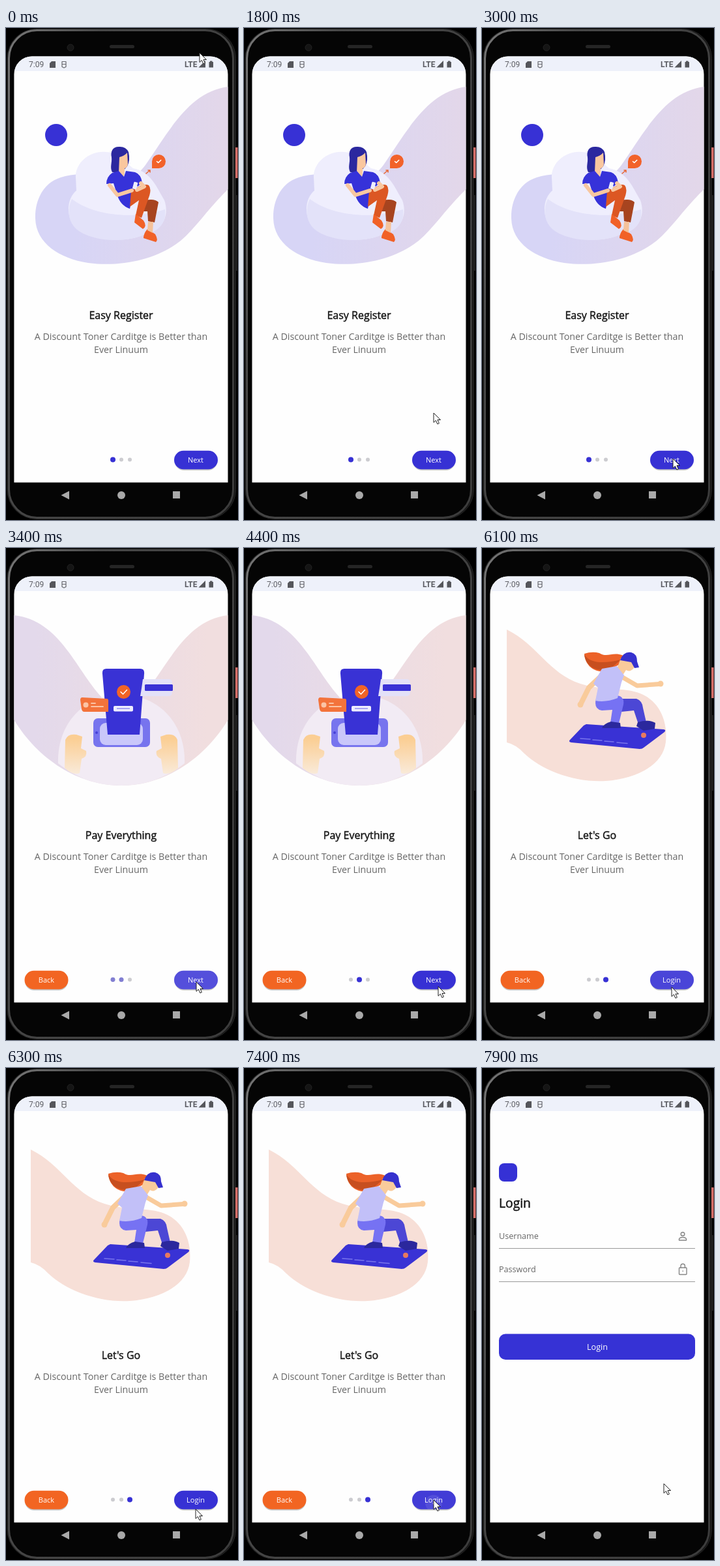
Recreate the animation shown at these times as an HTML page. Size 356 by 754 pixels, loop 8 s.

```html
<!DOCTYPE html>
<html lang="en">
<head>
<meta charset="utf-8">
<title>Onboarding</title>
<style>
  html, body { margin: 0; width: 100%; height: 100%; overflow: hidden; background: #000; }
  svg { display: block; width: 356px; height: 754px; }
  text { font-family: "Open Sans", sans-serif; }
  .status { font: 12px Roboto, sans-serif; fill: #5c5d63; }
  .net { font-weight: 600; }
  .title { font-size: 16px; fill: #161616; stroke: #161616; stroke-width: .45px; text-anchor: middle; }
  .body { font-size: 14.26px; fill: #666; text-anchor: middle; }
  .btn { font-size: 11px; fill: #fff; text-anchor: middle; }
  .field { font-size: 12.6px; fill: #666; }
  .line { fill: none; stroke-linecap: round; stroke-linejoin: round; }
</style>
</head>
<body>
<svg viewBox="0 0 356 754">
  <defs>
    <linearGradient id="lilac"><stop offset=".2" stop-color="#d7d5f6"/><stop offset="1" stop-color="#e3d7e9"/></linearGradient>
    <linearGradient id="wings"><stop offset=".1" stop-color="#e3d9eb"/><stop offset=".9" stop-color="#f1dedf"/></linearGradient>
    <linearGradient id="hand" x2="0" y2="1"><stop offset=".1" stop-color="#fbce93"/><stop offset="1" stop-color="#f9ead9"/></linearGradient>
    <linearGradient id="metal" x2="1" y2=".6"><stop stop-color="#777"/><stop offset=".3" stop-color="#484848"/><stop offset="1" stop-color="#3c3c3c"/></linearGradient>
    <clipPath id="pill"><rect x="258" y="647.700" width="67" height="28.600" rx="14.300"/></clipPath>
    <clipPath id="glass"><path d="M12.400 696.600V71a27.500 27.500 0 0 1 27.500-27.500H313a27.500 27.500 0 0 1 27.500 27.500V696.600Z"/></clipPath>
  </defs>

  <!-- phone body -->
  <rect width="356" height="754"/>
  <rect x="2" y="1.500" width="350.500" height="751" rx="45" fill="#161616" stroke="#262626"/>
  <rect x="4.500" y="3.500" width="344" height="747" rx="43" fill="#050505" stroke="url(#metal)" stroke-width="3"/>
  <rect x="352" y="183" width="3.500" height="47" fill="#d9716b"/>
  <rect x="353" y="256" width="2" height="116" fill="#1c1c1c"/>
  <rect x="159" y="26" width="38" height="5" rx="2.500" fill="#252525"/>
  <circle cx="99" cy="30" r="5" fill="#151515" stroke="#222"/>
  <g fill="#a9a9a9">
    <path d="M84.500 716l12.500-6.500v13Z"/><circle cx="177" cy="716" r="6"/><rect x="256" y="710" width="11" height="11"/>
  </g>

  <g clip-path="url(#glass)">
    <rect x="12" y="43" width="329" height="654" fill="#fefefe"/>
    <rect x="12" y="43" width="329" height="23" fill="#eef1fa"/>
    <text class="status" x="35" y="60">7:09</text>
    <text class="status net" x="274" y="60">LTE</text>
    <g fill="#55565b">
      <path d="M70 51h6v10h-9v-7Z"/><path d="M306 50v10.500h-10.500Z"/>
      <path d="M311.500 52h1.500v-1.500h3.500v1.500h1.500v8.500h-6.500Z"/>
      <path class="line" d="M86 51.500h6v4h-6Zm0 4v4l3 1.500 3-1.500v-4" stroke="#66676c" stroke-width="1.200"/>
    </g>

    <g class="page">
      <path fill="url(#lilac)" d="M341 90C282 97 250 158 216 207C196 237 170 236 150 230C128 222 102 223 84 229C58 237 44 263 45 292C46 330 82 353 126 360C178 367 233 354 268 326C292 306 312 274 341 247Z"/>
      <path fill="#efeefd" d="M107 229C106 207 128 188 153 190C174 191 184 206 195 215C223 220 232 246 243 264C252 289 238 312 213 316C182 331 127 326 105 304C92 288 93 262 108 249Z"/>
      <path fill="#e3e2f9" d="M101 262C132 286 192 295 244 278C247 299 233 313 213 316C180 332 122 326 104 304C95 293 94 276 101 262Z"/>
      <circle cx="77" cy="164" r="17" fill="#3731d5"/>
      <path fill="#2b289f" d="M175 182C164 181 160 189 162 198C163 207 159 213 163 221L177 222 186 212Q191 203 188 190Q184 182 175 182Z"/>
      <path fill="#fac79e" d="M174 198Q182 196 186 191L187 208Q186 215 182 215V221L181 228 173 221Z"/>
      <path fill="#3632d9" d="M163 222L173 219 181 228 184 219 198 221Q207 224 209 237L202 243 198 239 196 249 190 277Q175 272 170 254L165 238 154 239Q154 228 163 222Z"/>
      <path fill="#a7441f" d="M214 264Q228 261 234 267L228 298 218 296 217 281H203Z"/>
      <path fill="#dc5723" d="M192 250Q211 237 219 241Q224 247 219 260L208 291 199 287 204 264 190 274Z"/>
      <path class="line" stroke="#f8c7a0" stroke-width="6" d="M159 241L171 256 193 249M207 238L212 243 201 248"/>
      <path fill="#f16127" d="M199 285L211 295Q217 304 210 308L197 298ZM217 308L229 316Q234 325 230 328L211 322Q211 315 217 308Z"/>
      <path fill="#f5c29a" d="M218 297h8l-1 17-8-4Z"/>
      <rect x="195" y="236" width="6" height="11" rx="1" fill="#eeeefc" transform="rotate(15 198 242)"/>
      <path class="line" stroke="#e76a38" stroke-width="1.600" d="M215 223l6-5m-3 0h3v3"/>
      <path fill="#f2622a" d="M224 215V204.500a10.500 10.500 0 1 1 10.500 10.500Z"/>
      <path class="line" stroke="#fff" stroke-width="1.600" d="M231.500 204.500l2.200 2 4-4"/>
      <text class="title" x="176.500" y="446">Easy Register</text>
    </g>

    <g class="page">
      <path fill="url(#wings)" d="M12 103C85 111 108 190 151 233Q177 256 203 233C246 190 270 111 341 103V263C303 325 242 364 177 364S50 325 12 263Z"/>
      <path fill="#f2ebf4" d="M80 330C78 270 119 225 177 225S276 270 274 330C244 353 214 364 177 364S109 353 80 330Z"/>
      <path id="palm" fill="url(#hand)" d="M91 294Q95 284 108 286L117 289 115 307 123 311Q125 320 116 323L113 345Q103 349 90 337Z"/>
      <use href="#palm" transform="matrix(-1 0 0 1 354 0)"/>
      <rect x="134" y="261" width="87" height="44" rx="7" fill="#7774ee"/>
      <rect x="144" y="268" width="66" height="34" rx="9" fill="#c9c7fa"/>
      <circle cx="139" cy="283" r="2" fill="#4540d8"/>
      <path fill="#3932d5" d="M154 185H206Q213 185 212 193L205 286H156L148 193Q147 185 154 185Z"/>
      <circle cx="180.500" cy="220.500" r="10.500" fill="#f26426"/>
      <path class="line" stroke="#fff" stroke-width="1.500" d="M176 220.500l3.500 3.500 6-6.500"/>
      <rect x="165" y="242" width="30" height="8.500" rx="2" fill="#eeedff"/>
      <path stroke="#918df0" stroke-width="1.500" d="M170 246h20"/>
      <path fill="#e3e1f8" d="M210 201h40q5 0 5 6v14q0 6-6 6h-43l2-12Z"/>
      <rect x="213" y="209" width="43" height="10" rx="1.500" fill="#3a32d5"/>
      <path fill="#f3733b" d="M117 229L155 231Q157 231 157 234V251H120Q117 251 116 247L114 233Q114 229 117 229Z"/>
      <circle cx="122.500" cy="240.500" r="4" fill="#fbc4a5"/>
      <path class="line" stroke="#fbc4a5" stroke-width="1.800" d="M131 238h6M131 243h18"/>
      <text class="title" x="176.500" y="446">Pay Everything</text>
    </g>

    <g class="page">
      <path fill="#f7dfd7" d="M38 125C84 147 102 192 151 208C184 219 219 213 243 223C273 235 285 266 282 297C278 335 233 354 190 357C142 360 91 340 65 315Q52 301 38 298Z"/>
      <path class="line" stroke="#f9cb9b" stroke-width="8" d="M181 198L164 214 152 238"/>
      <path class="line" stroke="#f9cb9b" stroke-width="7" d="M212 196L238 211 272 208.500"/>
      <path fill="#ec6229" d="M217 165C200 158 193 169 180 161Q169 158 157 162C158 178 169 188 182 189C196 190 203 180 217 177Z"/>
      <path fill="#c74f1f" d="M157 163C165 178 190 177 213 171L204 179C188 194 159 187 157 163Z"/>
      <path fill="#f9cb9b" d="M213 169L234 173 233 184Q227 191 221 187L216 195 207 185Z"/>
      <path fill="#3631ce" d="M212 172Q217 158 229 160Q238 162 238 174L241 183 234 184 229 175Z"/>
      <path fill="#3932d5" d="M160 270L279 278Q283 279 280 282L248 306Q246 308 242 308L137 298Q132 297 135 294L156 272Z"/>
      <path class="line" stroke="#7975ed" stroke-width="1.500" d="M151 292l15 1M170 294l14 1M188 296l14 1M207 298l16 1.500"/>
      <circle cx="248" cy="287" r="4" fill="#e8795f"/>
      <path fill="#4c47d5" d="M202 231L237 231Q246 234 247 245L252 267 240 270 233 249 204 252Z"/>
      <path fill="#7672f3" d="M175 231L208 226Q219 228 217 240L210 269 197 268 200 248 184 249Q171 247 175 231Z"/>
      <path fill="#c2c0f8" d="M184 185L207 181 218 195 214 206 208 230Q190 237 174 234L178 214 171 208Z"/>
      <path fill="#2b289d" d="M198 266L212 268 213 276H184Q187 269 198 266ZM239 267Q256 262 266 268L265 277 248 280 237 273Z"/>
      <circle cx="151" cy="240" r="4.500" fill="#f9cb9b"/><circle cx="274" cy="208" r="4.500" fill="#f9cb9b"/>
      <text class="title" x="176.500" y="446">Let's Go</text>
    </g>

    <g class="page">
      <rect x="26" y="146" width="28" height="28" rx="8" fill="#3531d5"/>
      <text class="title" x="26" y="214" style="font-size:19.300px;text-anchor:start">Login</text>
      <text class="field" x="26" y="262">Username</text>
      <text class="field" x="26" y="313">Password</text>
      <path stroke="#9a9a9a" d="M26 276.500H327M26 327.500H327"/>
      <g class="line" stroke="#858585" stroke-width="1.400">
        <circle cx="308" cy="254.500" r="2.800"/><path d="M302.500 264v-2q1-2.500 5.500-2.500t5.500 2.500v2Z"/>
        <rect x="302.500" y="306" width="11.500" height="10.500" rx="1"/><path d="M305 306v-2.500a3.200 3.200 0 0 1 6.400 0v2.500M308.200 311v.5"/>
      </g>
      <rect x="26" y="407.500" width="301" height="39.500" rx="10" fill="#3632d5"/>
      <text class="btn" x="177" y="432" style="font-size:12.600px">Login</text>
    </g>

    <g id="intro">
      <text class="body" x="176.500" y="478">A Discount Toner Carditge is Better than</text>
      <text class="body" x="176.500" y="498">Ever Linuum</text>
      <g id="back">
        <rect x="29" y="650" width="66" height="28" rx="14" opacity=".22"/>
        <rect x="28.500" y="647.700" width="67" height="28.600" rx="14.300" fill="#f26522"/>
        <text class="btn" x="62" y="666">Back</text>
      </g>
      <circle class="dot" cx="164" cy="661.500"/><circle class="dot" cx="177" cy="661.500"/><circle class="dot" cx="190" cy="661.500"/>
      <rect x="259" y="650" width="65" height="28" rx="14" opacity=".22"/>
      <g clip-path="url(#pill)">
        <rect x="258" y="647" width="67" height="30" fill="#3731d4"/>
        <rect id="tint" x="258" y="647" width="67" height="30" fill="#fff"/>
        <circle id="ripple" cx="291" cy="667" fill="#fff"/>
      </g>
      <text class="btn" id="label" x="291" y="666"></text>
    </g>
  </g>
  <path id="cursor" d="M0 0V14.500L3.400 11.400 5.900 17 8.400 15.900 6 10.500H10.500Z" fill="#fff" stroke="#222" stroke-width="1"/>
</svg>

<script>
const LOOP = 8000;
const CUTS = [0, 3300, 5900, 7450];      // when each page appears
const TAPS = [3170, 5720, 7330];
const FADE = 200;
// time, x, y of the pointer tip
const PATH = [
  [0, 297, 38], [300, 297, 60], [1500, 291, 590], [1900, 291, 590], [2700, 293, 660],
  [3100, 293, 660], [3400, 292, 665], [3900, 298, 672], [4500, 298, 672], [4700, 291, 667],
  [5800, 291, 667], [6300, 291, 676], [6500, 291, 676], [6800, 292, 688], [7200, 291, 662],
  [7450, 291, 662], [7900, 279, 637], [8000, 279, 637]
];

const $ = id => document.getElementById(id);
const all = name => [...document.getElementsByClassName(name)];
const pages = all('page'), dots = all('dot');
const clamp = v => Math.max(0, Math.min(1, v));
const mix = (a, b, k) => a + (b - a) * k;
const show = (el, on) => { el.style.display = on ? '' : 'none'; };

function pointer(t) {
  const i = PATH.findIndex(p => p[0] > t);
  const [t0, x0, y0] = PATH[i - 1], [t1, x1, y1] = PATH[i];
  const k = (t - t0) / (t1 - t0), e = k * k * (3 - 2 * k);
  return [mix(x0, x1, e), mix(y0, y1, e)];
}

function drawDots(t, page) {
  const k = page ? clamp((t - CUTS[page]) / FADE) : 1;
  dots.forEach((dot, i) => {
    const on = i === page ? k : i === page - 1 ? 1 - k : 0;
    const [r, g, b] = [mix(204, 55, on), mix(204, 49, on), mix(208, 212, on)];
    dot.setAttribute('r', mix(3, 4, on));
    dot.setAttribute('fill', `rgb(${r},${g},${b})`);
  });
}

function drawRipple(t) {
  const dt = t - (TAPS.filter(s => s <= t).pop() ?? -LOOP);
  const fade = 1 - clamp((dt - 300) / 220);
  $('tint').setAttribute('opacity', .06 * clamp(dt / 75) * fade);
  $('ripple').setAttribute('r', Math.min(50, dt * .18));
  $('ripple').setAttribute('opacity', .09 * fade);
}

function draw(t) {
  const page = CUTS.filter(c => c <= t).length - 1;
  pages.forEach((el, i) => show(el, i === page));
  show($('intro'), page < 3);
  show($('back'), page > 0);
  $('label').textContent = page < 2 ? 'Next' : 'Login';
  drawDots(t, page);
  drawRipple(t);
  $('cursor').setAttribute('transform', `translate(${pointer(t)})`);
}

const start = performance.now();
function tick() {
  draw((performance.now() - start) % LOOP);
  requestAnimationFrame(tick);
}
tick();
</script>
</body>
</html>
```
